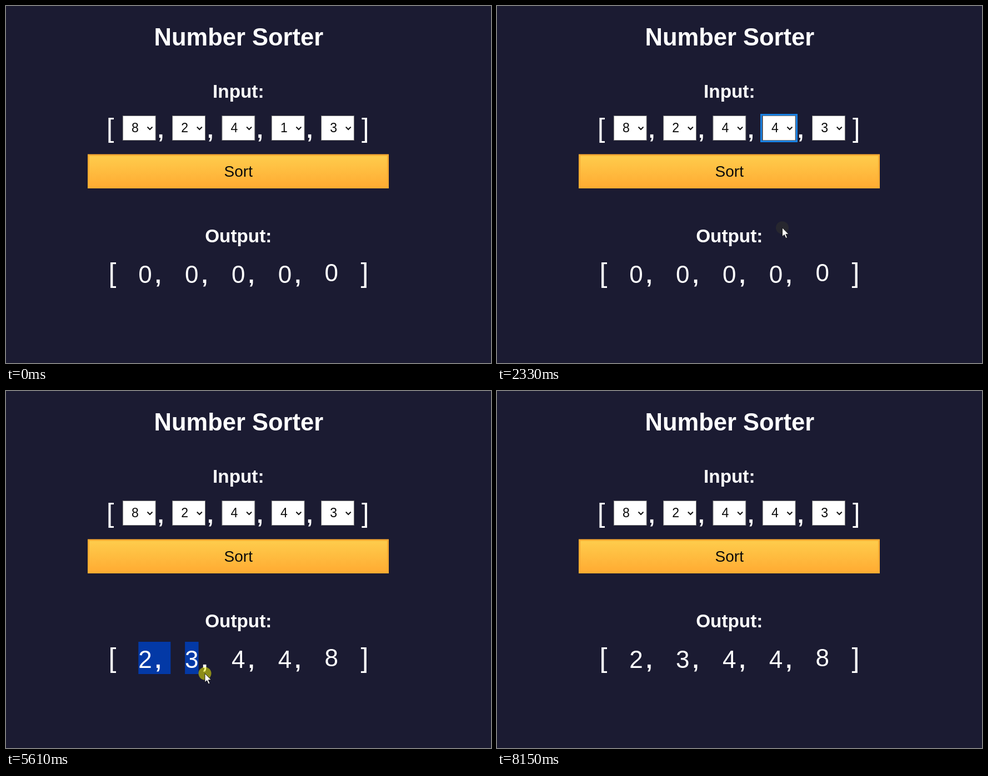
These frames come from a looping animation (873x642 px, 9810 ms). An HTML page:

```html
<!DOCTYPE html>
<html lang="en">
<head>
<meta charset="utf-8">
<title>Number Sorter</title>
<style>
  html, body { margin: 0; width: 100%; height: 100%; overflow: hidden; background: #1b1b32; }
  svg { display: block; width: 873px; height: 642px; }
  text { font-family: "Liberation Sans", Arial, sans-serif; fill: #fff; white-space: pre; }
  .mid { text-anchor: middle; }
  .bold { font-weight: bold; }
  .dark { fill: #0a0a0a; }
</style>
</head>
<body>
<svg id="stage" viewBox="0 0 873 642">
  <defs>
    <linearGradient id="gold" x1="0" y1="0" x2="0" y2="1">
      <stop offset="0" stop-color="#fecc4c"/>
      <stop offset="1" stop-color="#ffac33"/>
    </linearGradient>
    <filter id="shade" x="-100%" y="-20%" width="300%" height="140%">
      <feDropShadow dx="0" dy="9" stdDeviation="12" flood-color="#000" flood-opacity=".3"/>
    </filter>
  </defs>
  <rect width="873" height="642" fill="#1b1b32"/>
</svg>
<script>
const LOOP = 9810;
const OPEN = 1150, PICK = 2160, SORT = 3600, DESELECT = 7260;
const DRAG = [5200, 6370];
const CENTER = 418.3, ROW = 33.8, LIST_TOP = 247;
const CHOSEN = 3, CHOICE = 4;
const stage = document.getElementById('stage');

function add(tag, attrs, parent = stage, content = '') {
  const el = document.createElementNS('http://www.w3.org/2000/svg', tag);
  for (const key in attrs) el.setAttribute(key, attrs[key]);
  el.textContent = content;
  parent.appendChild(el);
  return el;
}
const label = (content, x, y, size, cls = '', parent = stage) =>
  add('text', { x, y, 'font-size': size, class: cls }, parent, content);
const show = (el, on) => el.setAttribute('visibility', on ? 'visible' : 'hidden');
const within = (t, a, b) => t >= a && t < b;

const before = [8, 2, 4, 1, 3];
const after = before.with(CHOSEN, CHOICE);
const sorted = [...after].sort();

// Headings
label('Number Sorter', CENTER + .5, 71, 43.5, 'mid bold');
label('Input:', CENTER, 165, 33.3, 'mid bold');
label('Output:', CENTER, 425, 33.3, 'mid bold');

// Input row
label('[', 181, 236, 48);
label(']', 640, 236, 48);
const inputs = before.map((n, i) => {
  const x = 210 + 89.3 * i;
  add('rect', { x: x + .3, y: 197.5, width: 58.9, height: 44, fill: '#fff', stroke: '#767676' });
  add('path', { d: `M${x + 44.5} 217.5l4.5 4.5l4.5-4.5`, fill: 'none', stroke: '#111', 'stroke-width': 2 });
  if (i < 4) label(',', x + 63, 237, 40, 'bold');
  return label(n, x + 16, 227, 23, 'dark');
});
const ring = add('rect', { x: 475.5, y: 195.5, width: 64, height: 48, fill: 'none', stroke: '#1a82e4', 'stroke-width': 3 });

// Button
add('rect', { x: 147, y: 266.5, width: 542, height: 61.5, fill: '#feac32' });
add('rect', { x: 150, y: 269.5, width: 536, height: 55.5, fill: 'url(#gold)' });
label('Sort', CENTER, 307, 28, 'mid dark');

// Output row
label('[', 184.5, 497, 50);
label(']', 638.5, 497, 50);
const outputs = sorted.map((n, i) => {
  const x = 238.3 + 83.8 * i, last = i === 4;
  const mark = add('rect', { x, y: last ? 455 : 451, height: last ? 50 : 58, fill: '#0339a6' });
  if (!last) label(',', x + 30, 498, 40, 'bold');
  return { n, x, mark, full: last ? 37 : 58, text: label(0, x, last ? 495 : 498, 44) };
});

// Option list
const list = add('g', {});
add('rect', { x: 477, y: LIST_TOP, width: 60, height: ROW * 10, rx: 6, fill: '#fff', filter: 'url(#shade)' }, list);
const hover = add('rect', { x: 477, width: 60, height: ROW, fill: '#767676' }, list);
const options = Array.from({ length: 10 }, (_, i) =>
  label(i, 508, LIST_TOP + ROW * i + 24.5, 23, 'mid dark', list));

// Pointer
const pointer = add('g', {});
const press = add('circle', { r: 11.5, fill: '#ff0' }, pointer);
add('path', {
  d: 'M0 0V16L3.7 12.6L6.4 18.8L9 17.7L6.3 11.6H11.4Z',
  fill: '#fff', stroke: '#111', 'stroke-width': .9
}, pointer);

// Each move eases from the previous stop; the pointer rests in between.
const move = (from, to, x, y) => ({ from, to, x, y });
const entry = { x: 803, y: 650 };
const moves = [
  move(120, 1080, 505, 222),
  move(1330, 1700, 510, 322),
  move(1800, 2060, 514, LIST_TOP + ROW * (CHOICE + .5)),
  move(2300, 2980, 432, 337),
  move(2980, 3080, 443, 319.5),
  move(SORT, 4300, 421, 342),
  move(4440, 5150, 146, 530),
  move(DRAG[0], 5610, 358, 508),
  move(5610, 6150, 621, 503),
  move(6250, DRAG[1], 636, 503),
  move(6720, 7200, 660, 330),
  move(7300, 7700, 600, 538),
  move(7730, 8150, 735, 650)
];
const clicks = [OPEN, 2140, 3200, DESELECT];

function pointerAt(t) {
  let { x, y } = entry;
  for (const m of moves) {
    if (t < m.from) break;
    const u = Math.min((t - m.from) / (m.to - m.from), 1);
    const ease = u * u * (3 - 2 * u);
    x += (m.x - x) * ease;
    y += (m.y - y) * ease;
  }
  return [x, y];
}

function pressLevel(t) {
  if (within(t, ...DRAG)) return 1;
  const age = Math.min(...clicks.map(c => t < c ? Infinity : t - c));
  return Math.max(0, Math.min(1, (age + 20) / 60, (200 - age) / 80));
}

function draw(t) {
  const [x, y] = pointerAt(t);
  show(pointer, within(t, moves[0].from, moves.at(-1).to));
  pointer.setAttribute('transform', `translate(${x} ${y})`);
  press.setAttribute('opacity', .5 * pressLevel(t));

  show(ring, within(t, OPEN, SORT));
  show(list, within(t, OPEN, PICK));
  const row = Math.max(before[CHOSEN], Math.min(9, Math.floor((y - LIST_TOP - 9) / ROW)));
  hover.setAttribute('y', LIST_TOP + ROW * row);
  options.forEach((o, i) => o.setAttribute('class', i === row ? 'mid' : 'mid dark'));
  inputs[CHOSEN].textContent = (t < PICK ? before : after)[CHOSEN];

  const selecting = within(t, DRAG[0], DESELECT);
  const reach = t < DRAG[1] ? x : 636;
  for (const o of outputs) {
    o.text.textContent = t < SORT ? 0 : o.n;
    const past = reach - o.x;
    o.mark.setAttribute('width', !selecting || past < 12 ? 0 : past < 37 ? 24.5 : o.full);
  }
}

const start = performance.now();
function tick() {
  draw((performance.now() - start) % LOOP);
  requestAnimationFrame(tick);
}
tick();
</script>
</body>
</html>
```
